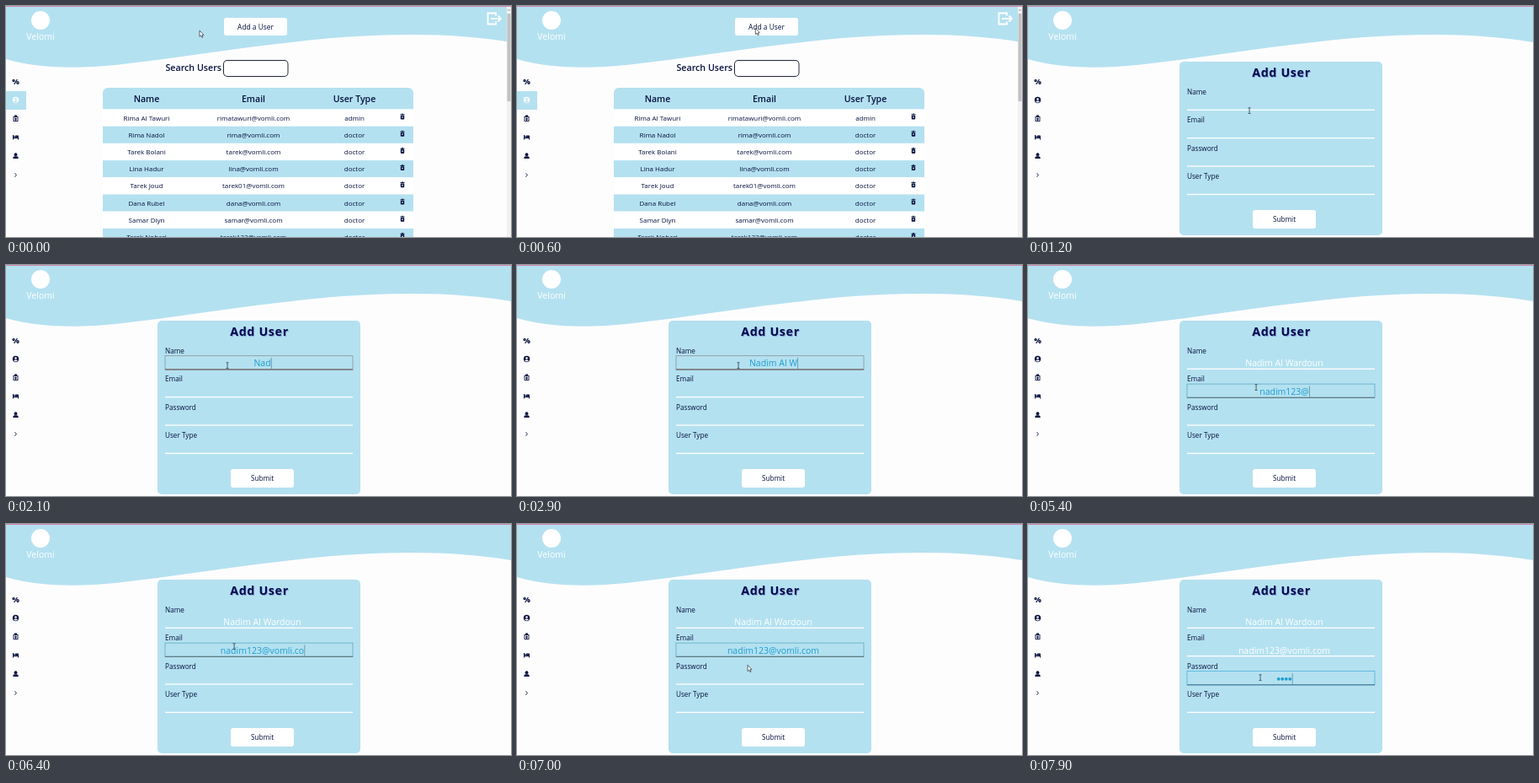
An HTML page with a canvas that plays this animation: 600 by 274 pixels, repeating every 8000 ms.

```html
<!DOCTYPE html>
<html lang="en">
<head>
<meta charset="utf-8">
<title>Add a user</title>
<style>
html, body { margin: 0; width: 100%; height: 100%; overflow: hidden; background: #fefdfe; }
canvas { display: block; width: 600px; height: 274px; }
</style>
</head>
<body>
<canvas id="stage" width="600" height="274"></canvas>
<script>
const ctx = document.getElementById('stage').getContext('2d');
const LOOP = 8000, STEP = 100, OPEN_FORM = 800;
const SKY = '#b4e1f0', PAPER = '#fefdfe', NAVY = '#06113f', INK = '#1b9dd2';
const FONT = '"Open Sans", "Noto Sans", sans-serif';
const FIELD_MID = 304.5, PITCH = 33.4;

const MAIL = '@vomli.com';
const users = [
  ['Rima Al Tawuri', 'rimatawuri' + MAIL, 'admin'],
  ['Rima Nadol', 'rima' + MAIL, 'doctor'],
  ['Tarek Bolani', 'tarek' + MAIL, 'doctor'],
  ['Lina Hadur', 'lina' + MAIL, 'doctor'],
  ['Tarek Joud', 'tarek01' + MAIL, 'doctor'],
  ['Dana Rubel', 'dana' + MAIL, 'doctor'],
  ['Samar Diyn', 'samar' + MAIL, 'doctor'],
  ['Tarek Nobari', 'tarek123' + MAIL, 'doctor']
];

// keys: [time, characters typed]
const fields = [
  { label: 'Name', value: 'Nadim Al Wardoun', focus: 1500, blur: 4300,
    edge: '#8b9298', base: '#70646a', keys: [[1750, 0], [3590, 16]] },
  { label: 'Email', value: 'nadim123' + MAIL, focus: 4300, blur: 7100,
    edge: '#5fa9c6', base: '#5f7580', keys: [[4400, 0], [4900, 6], [5400, 9], [6400, 17], [6525, 18]] },
  { label: 'Password', value: '•'.repeat(8), focus: 7100, blur: LOOP, dots: true,
    edge: '#4fb1da', base: '#547f98', keys: [[7250, 0], [7850, 4]] },
  { label: 'User Type', value: '', focus: LOOP, blur: LOOP, keys: [[0, 0]] }
];

// [time, x, y]
const pointer = [
  [0, 230, 29], [100, 231, 29], [500, 283, 26], [800, 284, 27], [900, 283, 44],
  [1200, 263, 124], [1500, 263, 119], [3800, 263, 119], [3900, 265, 118],
  [4250, 271, 145], [6850, 271, 145], [7100, 276, 182], [8000, 276, 182]
];

// Linear interpolation of one column in a list of timed keys.
function at(keys, t, col = 1) {
  if (t <= keys[0][0]) return keys[0][col];
  for (let i = 1; i < keys.length; i++) {
    const a = keys[i - 1], b = keys[i];
    if (t <= b[0]) return a[col] + (b[col] - a[col]) * (t - a[0]) / (b[0] - a[0]);
  }
  return keys[keys.length - 1][col];
}

// y is the middle of the capital letters.
function text(str, x, y, size, { color = NAVY, weight = 400, align = 'center' } = {}) {
  ctx.font = `${weight} ${size}px ${FONT}`;
  ctx.textAlign = align;
  ctx.fillStyle = color;
  ctx.fillText(str, x, y + size * 0.357);
}

function rect(x, y, w, h, color) {
  ctx.fillStyle = color;
  ctx.fillRect(x, y, w, h);
}

function round(x, y, w, h, r, color) {
  ctx.fillStyle = color;
  ctx.beginPath();
  ctx.roundRect(x, y, w, h, r);
  ctx.fill();
}

function disc(x, y, r, color) {
  ctx.fillStyle = color;
  ctx.beginPath();
  ctx.arc(x, y, r, 0, Math.PI * 2);
  ctx.fill();
}

function line(points, color, width) {
  ctx.strokeStyle = color;
  ctx.lineWidth = width;
  ctx.beginPath();
  points.forEach(([x, y]) => ctx.lineTo(x, y));
  ctx.stroke();
}

function header() {
  rect(0, 0, 600, 274, PAPER);
  ctx.fillStyle = SKY;
  ctx.beginPath();
  ctx.moveTo(0, 0);
  ctx.lineTo(0, 63);
  ctx.bezierCurveTo(40, 75, 90, 74, 130, 70);
  ctx.bezierCurveTo(220, 60, 300, 45, 400, 37);
  ctx.bezierCurveTo(480, 31, 550, 34, 600, 43);
  ctx.lineTo(600, 0);
  ctx.fill();
  rect(0, 0, 600, 1, '#d486b2');
  disc(41, 17, 11, '#fff');
  text('Velomi', 41, 36, 10.5, { color: '#fff' });
}

function person(x, y, front, back) {
  disc(x, y, 3.7, front);
  disc(x, y - 1, 1.3, back);
  ctx.beginPath();
  ctx.ellipse(x, y + 2, 2.2, 1.1, 0, 0, Math.PI * 2);
  ctx.fill();
}

function sidebar(active) {
  if (active) rect(0, 101, 24, 22, SKY);
  text('%', 11.5, 89.5, 9, { weight: 800 });
  person(11.5, 111.5, active ? '#fff' : NAVY, active ? SKY : PAPER);

  ctx.strokeStyle = NAVY;
  ctx.lineWidth = 0.9;
  ctx.strokeRect(9, 131.5, 5, 5);
  rect(10, 129.5, 3, 2, NAVY);
  rect(11, 132.5, 1, 4, NAVY);
  rect(10, 133.5, 3, 1, NAVY);

  rect(8, 153, 1, 5.5, NAVY);
  rect(8, 155.5, 7, 1.6, NAVY);
  rect(14, 155.5, 1, 3, NAVY);
  round(11, 153.6, 4, 2.2, 1, NAVY);
  disc(10, 154.6, 0.8, NAVY);

  disc(11.5, 176.2, 1.9, NAVY);
  round(8.3, 178.2, 6.4, 2.8, [2, 2, 0.5, 0.5], NAVY);
  line([[10.5, 198.3], [12.4, 200.5], [10.5, 202.7]], NAVY, 0.9);
}

function trash(x, y) {
  rect(x - 2.5, y - 3, 5, 1, NAVY);
  rect(x - 1, y - 3.6, 2, 1, NAVY);
  round(x - 2.2, y - 1.6, 4.4, 4.8, 0.8, NAVY);
  rect(x - 0.8, y - 0.2, 1.6, 1.6, '#c9d5e2');
}

function listPage() {
  header();
  sidebar(true);
  round(259, 14, 75, 21, 3, '#fff');
  text('Add a User', 296.5, 25, 8.4);
  line([[582, 11.5], [582, 8.5], [572.5, 8.5], [572.5, 21.5], [582, 21.5], [582, 18.5]], '#fff', 1.8);
  line([[576, 15], [588, 15]], '#fff', 1.8);
  line([[584.5, 11.5], [588, 15], [584.5, 18.5]], '#fff', 1.8);

  text('Search Users', 256, 73, 10.7, { weight: 600, align: 'right' });
  round(258, 64, 77.5, 20, 5, '#222838');
  round(259, 65, 75.5, 18, 4, '#fff');

  const cols = [167, 294, 414];
  round(115, 97, 369, 25.5, [6, 6, 0, 0], SKY);
  ['Name', 'Email', 'User Type'].forEach((s, i) => text(s, cols[i], 110, 10.6, { weight: 600 }));
  users.forEach((row, i) => {
    const y = 122.5 + i * 20.2;
    rect(115, y, 369, 20.2, i % 2 ? SKY : '#fff');
    row.forEach((s, c) => text(s, cols[c], y + 10.2, 8, { weight: 500 }));
    trash(471, y + 8.8);
  });

  rect(595, 1, 5, 273, '#f1f1f1');
  rect(595.5, 9, 4, 104, '#c1c1c1');
  line([[596.3, 5.5], [597.5, 4], [598.7, 5.5]], '#777', 0.8);
}

function field(f, i, t) {
  const y = i * PITCH, mid = 116.5 + y;
  const active = t >= f.focus && t < f.blur;
  const count = Math.floor(at(f.keys, t) + 1e-6);
  text(f.label, 189, 102 + y, 8.2, { align: 'left' });

  if (active) {
    ctx.strokeStyle = f.edge;
    ctx.lineWidth = 0.8;
    ctx.strokeRect(189, 107.7 + y, 223, 16.5);
    rect(189, 123.3 + y, 223, 1.2, f.base);
  } else {
    rect(189, 122.6 + y, 223, 1.3, '#fff');
  }

  let width;
  if (f.dots) {
    width = count * 4.5;
    for (let k = 0; k < count; k++) disc(FIELD_MID - width / 2 + 2.25 + k * 4.5, mid + 0.5, 1.9, INK);
  } else {
    const str = f.value.slice(0, count);
    text(str, FIELD_MID, mid, 10.5, { color: active ? INK : '#fff', weight: 500 });
    width = ctx.measureText(str).width;
  }
  if (active && count < f.value.length) rect(FIELD_MID + width / 2 + 0.3, mid - 6.5, 0.7, 13, '#527f95');
}

function formPage(t) {
  header();
  sidebar(false);
  round(180, 66, 241, 206, 5, SKY);
  ctx.letterSpacing = '0.7px';
  text('Add User', 302, 80, 14.2, { weight: 700, color: '#8ba5df' });
  text('Add User', 301, 79, 14.2, { weight: 700, color: '#020b4c' });
  ctx.letterSpacing = '0px';
  fields.forEach((f, i) => field(f, i, t));
  round(267, 242, 75, 22, 3, '#fff');
  text('Submit', 304.5, 253, 8.2);
}

function arrow(x, y) {
  ctx.beginPath();
  [[0, 0], [0, 7.4], [1.7, 5.9], [2.9, 8.4], [4, 7.9], [2.9, 5.5], [5, 5.4]]
    .forEach(([dx, dy]) => ctx.lineTo(x + dx, y + dy));
  ctx.closePath();
  ctx.fillStyle = '#fff';
  ctx.fill();
  ctx.strokeStyle = '#3a4250';
  ctx.lineWidth = 0.8;
  ctx.stroke();
}

function beam(x, y) {
  rect(x - 0.4, y - 3.2, 0.9, 6.6, '#3d4c5c');
  rect(x - 1.6, y - 3.6, 3.2, 0.8, '#3d4c5c');
  rect(x - 1.6, y + 3, 3.2, 0.8, '#3d4c5c');
}

function cursor(t) {
  const x = at(pointer, t, 1), y = at(pointer, t, 2);
  const row = (y - 107) % PITCH;
  const overField = t >= OPEN_FORM && y > 107 && row < 18;
  const moving = t >= 3900 && t < 4200;
  (overField && !moving ? beam : arrow)(x, y);
}

function draw(now) {
  const t = Math.floor((now % LOOP) / STEP) * STEP;
  if (t < OPEN_FORM) listPage();
  else formPage(t);
  cursor(t);
}

const start = performance.now();
function tick() {
  draw(performance.now() - start);
  requestAnimationFrame(tick);
}
tick();
</script>
</body>
</html>
```
